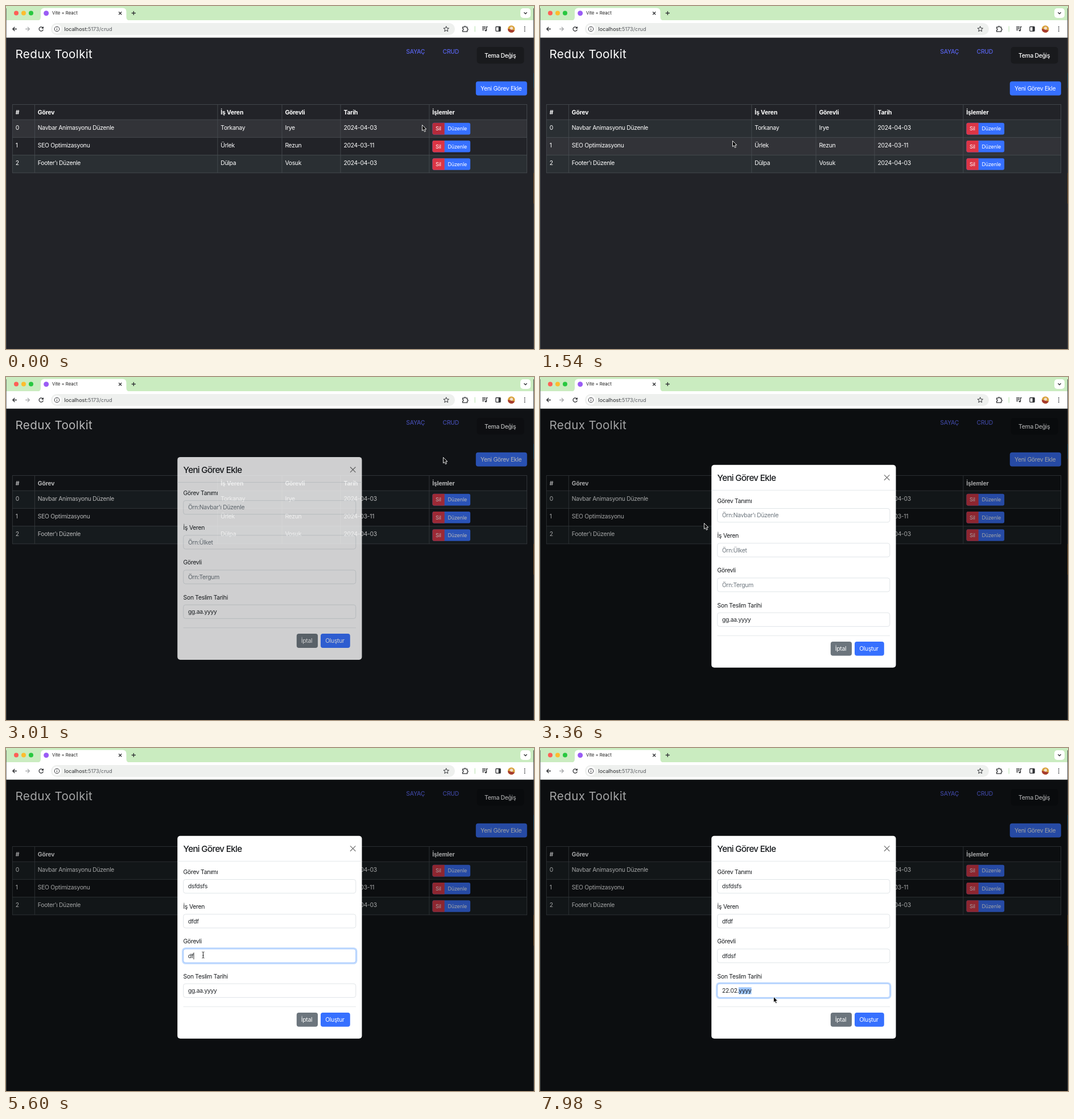
Recreate the animation shown at these times as an HTML page. Size 928x604 px, loop 8000 ms.

```html
<!DOCTYPE html>
<html lang="tr">
<head>
<meta charset="utf-8">
<title>Redux Toolkit</title>
<style>
  html, body { margin: 0; width: 100%; height: 100%; overflow: hidden; background: #222328; }
  svg { display: block; width: 100%; height: 100%; }
  text { font: 10.4px Inter, Roboto, sans-serif; letter-spacing: -.029em; fill: #fff; white-space: pre; }
  .title { font-size: 20.7px; letter-spacing: .3px; }
  .link { font-weight: 500; fill: #5762e8; }
  .medium { font-weight: 500; }
  .head { font-weight: 700; letter-spacing: -.015em; }
  .small { font-size: 9.07px; letter-spacing: -.02em; }
  .tab { font-size: 7.8px; letter-spacing: 0; fill: #1f1f1f; }
  .url { font-size: 9.1px; letter-spacing: 0; fill: #5a5d61; }
  .dark { fill: #16191c; }
  .modal-title { font-size: 15.2px; font-weight: 500; letter-spacing: -.045em; fill: #16191c; }
  .icon { fill: none; stroke: #303235; stroke-width: 1.3; }
</style>
</head>
<body>
<svg viewBox="0 0 928 604">
  <rect id="backdrop" width="928" height="604"/>

  <g id="page">
    <text class="title" x="16.5" y="92.2">Redux Toolkit</text>
    <text class="link" x="703.3" y="84.2">SAYAÇ</text>
    <text class="link" x="767.6" y="84.2">CRUD</text>
    <rect x="827.5" y="72" width="83" height="29.5" rx="5" fill="#000" fill-opacity=".27"/>
    <text class="medium" x="841" y="90.6">Tema Değiş</text>
    <rect x="825.8" y="132.8" width="90" height="24.8" rx="4" fill="#3670ff"/>
    <rect id="addHover" x="825.8" y="132.8" width="90" height="24.8" rx="4"/>
    <text x="834" y="149.2">Yeni Görev Ekle</text>
    <g id="table"></g>
  </g>

  <g id="modal">
    <rect x="301.3" y="154.8" width="324.2" height="357" rx="5" fill="#fff"/>
    <text class="modal-title" x="311.6" y="183">Yeni Görev Ekle</text>
    <path d="M605 172.4l9.4 9.4m0-9.4l-9.4 9.4" fill="none" stroke="#777" stroke-width="1.3"/>
    <path d="M301.3 199.4h324.2M311.6 455.6h303.4" stroke="#dee2e6" stroke-width=".8"/>
    <g id="fields"></g>
    <rect x="510.8" y="466" width="37.2" height="24.8" rx="4" fill="#6c757d"/>
    <text x="518.8" y="482.4">İptal</text>
    <rect x="553" y="466" width="51.8" height="24.8" rx="4" fill="#3670ff"/>
    <text x="561.2" y="482.4">Oluştur</text>
  </g>

  <g id="browser">
    <rect width="928" height="26" fill="#caecc0"/>
    <rect y="25" width="928" height="30.6" fill="#fff"/>
    <path d="M0 55.6h928" stroke="#cfd3cf" stroke-width=".6"/>
    <circle cx="18" cy="12.4" r="4" fill="#fe5f57"/>
    <circle cx="31" cy="12.4" r="4" fill="#febc2e"/>
    <circle cx="44" cy="12.4" r="4" fill="#28c840"/>
    <path d="M55 25.5q6 0 6-6V10q0-6.5 6.500-6.500h137.500q6.500 0 6.500 6.500v9.500q0 6 6 6z" fill="#fff"/>
    <circle cx="70.700" cy="12.700" r="4.500" fill="#9a5cf5"/>
    <text class="tab" x="81" y="15.200">Vite + React</text>
    <path class="icon" d="M198.200 10.200l5 5m0-5l-5 5" stroke-width="1"/>
    <path class="icon" d="M220.700 12.500h7.200m-3.600-3.600v7.200"/>
    <rect x="904" y="4" width="18" height="17" rx="5" fill="#fff"/>
    <path class="icon" d="M910.400 11.200l2.600 2.600 2.600-2.600"/>
    <path class="icon" d="M19 40.500h-7.200m3.500-3.500l-3.500 3.500 3.500 3.500"/>
    <path class="icon" d="M34.200 40.500h7.200m-3.500-3.500l3.500 3.500-3.500 3.500" style="stroke:#a9abad"/>
    <path class="icon" d="M65 38.600a3.700 3.700 0 1 0 .4 2.800M65.400 36.400v2.600h-2.600"/>
    <rect x="79" y="30" width="710" height="21" rx="10.500" fill="#eef0ee"/>
    <circle cx="89.500" cy="40.500" r="8" fill="#fff"/>
    <circle class="icon" cx="89.500" cy="40.500" r="4.300" style="stroke-width:1"/>
    <path class="icon" d="M89.500 40v2.600m0-4.600v1" style="stroke-width:1"/>
    <text class="url" x="102.500" y="43.800"><tspan fill="#26282a">localhost:</tspan>5173/crud</text>
    <path class="icon" id="star" style="stroke-width:1"/>
    <path class="icon" d="M802.600 37.200h2.600a1.500 1.500 0 0 1 3 0h2.400v2.600a1.500 1.500 0 0 1 0 3v2.400h-8v-2.600a1.500 1.500 0 0 0 0-3z"/>
    <path d="M824.200 35.500v10" stroke="#c6e8bc" stroke-width="1.300"/>
    <path class="icon" d="M837 37h6m-6 2.600h6m-6 2.600h3.600M844.500 43v-6.300h2.200"/>
    <circle cx="843.300" cy="43" r="1.600" fill="#303235"/>
    <rect class="icon" x="860.900" y="36.500" width="8.200" height="7.800" rx="1"/>
    <path d="M865.600 36.500h3.500v7.800h-3.500z" fill="#303235"/>
    <circle cx="888.200" cy="40.500" r="6.300" fill="#d9a23c"/>
    <path d="M882 40a6.300 6.300 0 0 0 12 3q-6-1-12-3z" fill="#a63a2e"/>
    <circle cx="888.500" cy="39" r="2.600" fill="#f0dccb"/>
    <path d="M911.700 37v.1m0 3.400v.1m0 3.400v.1" stroke="#303235" stroke-width="1.900" stroke-linecap="round"/>
    <path d="M.4 4v600" stroke="#55585a" stroke-width=".8"/>
    <path d="M927.400 4v600" stroke="#45474c"/>
    <path d="M927.500 118v26" stroke="#29546b"/>
    <path d="M927.500 294v54" stroke="#70502f"/>
  </g>

  <g id="cursor">
    <path id="arrow" d="M0 0v10.200l2.300-2.100 1.700 3.800 1.900-.8-1.700-3.700h3.200z" fill="#000" stroke="#fff" stroke-width=".9"/>
    <path id="hand" d="M-.9 6V.9Q0-.5 .9.900V4l3.400.8q1 .4.800 1.700L4.500 10H-.9L-3.600 6.500q-.2-1.400 1.200-1.200z" fill="#fff" stroke="#111" stroke-width=".8"/>
    <path id="beam" d="M-2-5.500q2 0 2 1.200v8.600q0 1.200 2 1.200M2-5.500q-2 0-2 1.200v8.600q0 1.200-2 1.200M-1.200.8h2.400" fill="none" stroke="#222" stroke-width=".9"/>
  </g>
</svg>

<script>
const $ = id => document.getElementById(id);
const LOOP = 8000, STEP = 70, MODAL_AT = 2890;
const ROW_TOP = 200.2, ROW_H = 31.2, FIELD_H = 61.2;
const columns = [11.4, 50.4, 371.9, 485, 588, 743.9, 915.5];
const label = (x, y, text, cls = '') => `<text class="${cls}" x="${x}" y="${y}">${text}</text>`;

const rows = [
  ['0', 'Navbar Animasyonu Düzenle', 'Torkanay', 'Irye', '2024-04-03'],
  ['1', 'SEO Optimizasyonu', 'Ürlek', 'Rezun', '2024-03-11'],
  ['2', "Footer'ı Düzenle", 'Dülpa', 'Vosuk', '2024-04-03']
];
const heads = ['#', 'Görev', 'İş Veren', 'Görevli', 'Tarih', 'İşlemler'];

function buildTable() {
  const fills = rows.map((_, i) =>
    `<rect class="row" x="11.4" y="${ROW_TOP + i * ROW_H}" width="904.1" height="${ROW_H}"/>`);
  const lines = [173.5, ...[0, 1, 2, 3].map(i => ROW_TOP + i * ROW_H)].map(y => `M11 ${y}H916`)
    .concat(columns.map(x => `M${x} 173.5V293.8`)).join('');
  const cells = rows.map((row, i) => {
    const y = ROW_TOP + i * ROW_H;
    return row.map((text, c) => label(columns[c] + 5.4, y + 17.3, text)).join('') +
      `<rect x="749.5" y="${y + 5.6}" width="66.6" height="20.6" rx="3" fill="#3670ff"/>
       <path class="del" d="M770.700 ${y + 5.6}h-18.200q-3 0-3 3v14.600q0 3 3 3h18.200z" fill="#dc3545"/>` +
      label(755, y + 19.2, 'Sil', 'small') + label(776.4, y + 19.2, 'Düzenle', 'small');
  });
  $('table').innerHTML = fills.join('') + `<path d="${lines}" stroke="#4b5055" stroke-width=".8"/>` +
    heads.map((text, c) => label(columns[c] + 5.4, 190.8, text, 'head')).join('') + cells.join('');
}

const fields = [
  { name: 'Görev Tanımı', hint: "Örn:Navbar'ı Düzenle", text: 'dsfdsfs', focus: 3780, type: 4130, pace: 70 },
  { name: 'İş Veren', hint: 'Örn:Ülket', text: 'dfdf', focus: 4900, type: 5040, pace: 70 },
  { name: 'Görevli', hint: 'Örn:Tergum', text: 'dfdsf', focus: 5460, type: 5530, pace: 70 },
  { name: 'Son Teslim Tarihi', focus: 6650 }
];

function buildFields() {
  $('fields').innerHTML = fields.map((f, i) => {
    const y = 231.3 + i * FIELD_H;
    return label(311.600, y - 9.3, f.name, 'dark') +
      `<rect class="ring" x="310.400" y="${y - 1.2}" width="305.800" height="27" rx="5.2" fill="none" stroke="#c2dbfe" stroke-width="2.600"/>
       <rect class="box" x="311.800" y="${y + .2}" width="303" height="24.200" rx="3.800" fill="#fff" stroke-width=".8"/>
       <rect class="mark" y="${y + 6.5}" height="12" fill="#9cc5fc"/>` +
      label(319.900, y + 16.1, '', 'value') +
      `<path class="caret" d="M0 ${y + 6.5}v12" stroke="#000" stroke-width=".8"/>`;
  }).join('');
  const all = cls => document.querySelectorAll('.' + cls);
  fields.forEach((f, i) => {
    for (const part of ['ring', 'box', 'mark', 'value', 'caret']) f[part] = all(part)[i];
  });
}

// Each point: time, x, y
const path = [
  [0, 731, 209], [210, 655, 222], [420, 560, 236], [840, 430, 243], [1120, 358, 270],
  [1330, 333, 266], [1540, 338, 237], [1610, 450, 192], [1680, 570, 156], [1890, 680, 162],
  [2170, 800, 183], [2380, 838, 168], [2520, 842, 156], [2800, 842, 155], [3010, 768, 141],
  [3150, 560, 196], [3360, 288, 257], [3640, 338, 246], [3780, 345, 243], [4620, 345, 243],
  [4760, 346, 317], [4900, 346, 305], [5250, 346, 305], [5460, 346, 364], [6020, 346, 364],
  [6300, 322, 412], [6440, 305, 431], [6580, 321, 428], [7560, 321, 428], [7770, 372, 439], [7980, 410, 437.5]
];

const clamp = v => Math.max(0, Math.min(1, v));
const mix = (a, b, k) => a + (b - a) * k;
const blend = (a, b, k) => `rgb(${a.map((v, i) => Math.round(mix(v, b[i], k)))})`;
const show = (el, on) => el.setAttribute('visibility', on ? 'visible' : 'hidden');

function pointer(t) {
  const i = Math.max(1, path.findIndex(p => p[0] >= t));
  const [a, b] = [path[i - 1], path[i]];
  const k = clamp((t - a[0]) / (b[0] - a[0]));
  return [mix(a[1], b[1], k), mix(a[2], b[2], k)];
}

// cubic-bezier(0, 0, .58, 1)
function easeOut(x) {
  let lo = 0, hi = 1;
  for (let n = 0; n < 20; n++) {
    const s = (lo + hi) / 2;
    if (1.74 * s * s * (1 - s) + s ** 3 < x) lo = s; else hi = s;
  }
  return 3 * lo * lo - 2 * lo ** 3;
}

function dateState(t) {
  if (t < 6650) return ['gg.aa.yyyy', null];
  if (t < 7420) return ['gg.aa.yyyy', 0];
  if (t < 7490) return ['02.aa.yyyy', 0];
  if (t < 7630) return ['22.aa.yyyy', 3];
  return ['22.02.yyyy', 6];
}

function drawField(f, i, t) {
  const next = fields[i + 1];
  const focused = t >= f.focus && !(next && t >= next.focus);
  show(f.ring, focused);
  f.box.setAttribute('stroke', focused ? '#86b7fe' : '#d9dde1');
  show(f.mark, false);
  show(f.caret, false);
  if (!f.text) {
    const [text, start] = dateState(t);
    f.value.textContent = text;
    f.value.style.fill = '#212529';
    if (start !== null) {
      const count = start === 6 ? 4 : 2;
      f.mark.setAttribute('x', f.value.getStartPositionOfChar(start).x - .3);
      f.mark.setAttribute('width', f.value.getSubStringLength(start, count) + .4);
      show(f.mark, true);
    }
    return;
  }
  const count = t < f.type ? 0 : Math.floor((t - f.type) / f.pace) + 1;
  const typed = f.text.slice(0, count);
  f.value.textContent = typed || f.hint;
  f.value.style.fill = typed ? '#212529' : '#6c757d';
  if (focused) {
    const end = typed ? f.value.getComputedTextLength() + .5 : 0;
    f.caret.setAttribute('transform', `translate(${319.9 + end})`);
    show(f.caret, true);
  }
}

function draw(t) {
  const [x, y] = pointer(t);
  const fade = clamp((t - MODAL_AT) / 150);
  const hovered = t < MODAL_AT ? Math.floor((y - ROW_TOP) / ROW_H) : -1;

  $('backdrop').setAttribute('fill', blend([34, 35, 40], [12, 14, 16], fade));
  $('page').setAttribute('opacity', mix(1, .62, fade));
  document.querySelectorAll('.row').forEach((row, i) => row.setAttribute('fill',
    i === hovered ? 'rgba(255,255,255,.075)' : i % 2 ? 'none' : 'rgba(122,163,163,.09)'));
  document.querySelector('.del').setAttribute('fill', blend([181, 43, 59], [220, 53, 69], clamp(t / 150)));
  $('addHover').setAttribute('opacity', .13 * clamp((t - 2590) / 150) * (1 - fade));

  $('modal').setAttribute('opacity', fade);
  $('modal').setAttribute('transform', `translate(0 ${-32.4 * (1 - easeOut(clamp((t - MODAL_AT) / 300)))})`);
  fields.forEach((f, i) => drawField(f, i, t));

  const hand = t >= 2450 && t < MODAL_AT;
  const beam = t >= 3640 && t < 6300;
  const hidden = t >= 7140 && t < 7560;
  show($('hand'), hand);
  show($('beam'), beam);
  show($('arrow'), !hand && !beam && !hidden);
  $('cursor').setAttribute('transform', `translate(${x + .5} ${y + .5})`);
}

buildTable();
buildFields();
$('star').setAttribute('d', 'M' + Array.from({ length: 10 }, (_, i) => {
  const r = i % 2 ? 2.2 : 5, a = i * Math.PI / 5;
  return [773.7 + r * Math.sin(a), 40.7 - r * Math.cos(a)];
}).join('L') + 'z');

const begin = performance.now();
function tick() {
  const t = (performance.now() - begin) % LOOP;
  draw(Math.floor(t / STEP) * STEP);
  requestAnimationFrame(tick);
}
tick();
</script>
</body>
</html>
```
